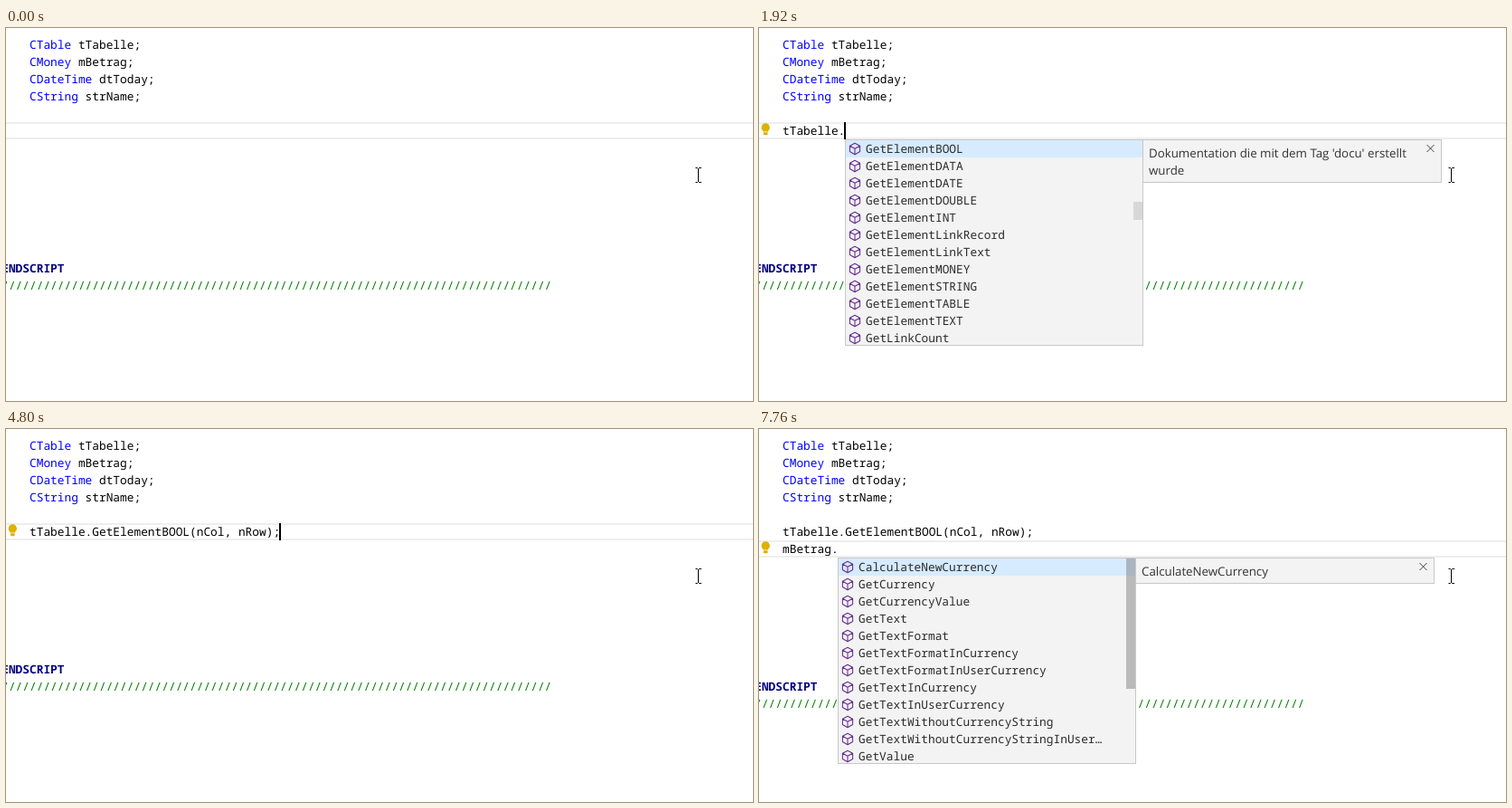
An HTML page for the animation above (8 s loop, 826 px wide and 412 px high).

```html
<!DOCTYPE html>
<html lang="de">
<head>
<meta charset="utf-8">
<title>Code completion</title>
<style>
  html, body { margin: 0; width: 100%; height: 100%; overflow: hidden; background: #fff; }
  svg { display: block; }
  text {
    font: 12.83px 'Noto Sans Mono', 'DejaVu Sans Mono', monospace;
    text-rendering: geometricPrecision;
    white-space: pre;
  }
  .type { fill: #00f; }
  .end { fill: #000080; font-weight: bold; }
  .comment { fill: #008000; }
  .item { fill: #2b2b2b; }
  .hit { fill: #0066bf; font-weight: bold; }
  .doc { font: 13.3px 'Open Sans', 'Noto Sans', sans-serif; fill: #333; }
</style>
</head>
<body>
<svg id="stage" width="826" height="412" viewBox="0 0 826 412">
  <defs>
    <g id="field" fill="none" stroke="#d67e00" stroke-width="1.15">
      <path d="M2.2 6.4 6.4 2.2 9 4.8 4.8 9ZM7.3 6.3H11.3M8.7 6.3V12.2H11.3"/>
      <path d="M11 6.6 13.3 4.3 15 6 12.7 8.3ZM11 12.3 13.3 10 15 11.7 12.7 14Z"/>
    </g>
    <g id="method" fill="none" stroke="#652d90" stroke-width="1.05" stroke-linejoin="round">
      <path d="M8 1.8 13.6 4.7V11L8 14.2 2.4 11V4.7ZM2.4 4.7 8 7.7 13.6 4.7M8 7.7V14.2"/>
    </g>
    <g id="bulb" fill="#ddb100">
      <path d="M7.3 1.3A4.7 4.7 0 0 1 10.2 9.6V10.5H4.4V9.6A4.7 4.7 0 0 1 7.3 1.3Z"/>
      <path d="M5 11.3H9.6V13.2L8.6 14.3H6L5 13.2Z"/>
    </g>
  </defs>
  <g id="code"></g>
  <path d="M762.5 154.5H764.5L765.5 155.5 766.5 154.5H769M765.5 155V170M762.5 170.5H764.5L765.5 169.5 766.5 170.5H769"
        fill="none" stroke="#000"/>
</svg>
<script>
const LOOP = 8000, CHAR = 7.698, LEFT = 26, ROW = 19, TOP = 104;
const CALL = 'tTabelle.GetElementBOOL(nCol, nRow);';
const DECLARED = ['CTable tTabelle;', 'CMoney mBetrag;', 'CDateTime dtToday;', 'CString strName;'];

const prefixed = (prefix, names) => names.split(' ').map(n => prefix + n);

const popups = {
  types: {
    icon: 'field', width: 430, bar: [1, 160],
    items: ['tTabelle', ...prefixed('TYPE_',
      'CTABLE BYTE CSTRING DATETIME INT PICTURE SUBTABLE FIXSTRING LINKTABLE SHORT VARSTRING')]
  },
  members: {
    icon: 'field', width: 430, bar: [1, 160], pick: 2,
    items: [...prefixed('m_', 'Job JobNr Rec Rec2 RecNr Step TabNr'), 'mBetrag',
      'DLG_EDIT_MONEY', 'DLG_EDIT_MULTILINE', 'SQLPARAM_COL_MONEY', 'TYPE_MONEY']
  },
  table: {
    icon: 'method', width: 330, bar: [69, 20],
    items: [...prefixed('GetElement',
      'BOOL DATA DATE DOUBLE INT LinkRecord LinkText MONEY STRING TABLE TEXT'), 'GetLinkCount'],
    doc: ["Dokumentation die mit dem Tag 'docu' erstellt", 'wurde']
  },
  money: {
    icon: 'method', width: 330, bar: [1, 144],
    items: ['CalculateNewCurrency', ...prefixed('Get', 'Currency CurrencyValue Text TextFormat ' +
      'TextFormatInCurrency TextFormatInUserCurrency TextInCurrency TextInUserCurrency ' +
      'TextWithoutCurrencyString TextWithoutCurrencyStringInUser… Value')],
    doc: ['CalculateNewCurrency']
  }
};

// Each step changes only the listed parts of the editor state.
const steps = [
  [0, { line1: '', line2: null, caret: 0, bulb: null, popup: null, thumb: 0, doc: 0, sel: 0 }],
  [150, { caret: 1 }],
  [530, { line1: 't' }],
  [610, { popup: 'types' }],
  [690, { thumb: 1 }],
  [760, { line1: 'tT' }],
  [910, { line1: 'tTA', thumb: 0 }],
  [1150, { bulb: 0 }],
  [1390, { caret: 0 }],
  [1620, { line1: 'tTabelle', popup: null, caret: 1 }],
  [1770, { line1: 'tTabelle.' }],
  [1920, { popup: 'table', doc: 1, thumb: .5 }],
  [2000, { thumb: 1 }],
  [2380, { caret: 0 }],
  [2620, { thumb: .6 }],
  [2850, { thumb: .3, caret: 1 }],
  [3150, { thumb: 0 }],
  [3320, { caret: 0 }],
  [3700, { line1: CALL, popup: null, doc: 0, sel: 24, caret: 1 }],
  [4170, { caret: 0 }],
  [4480, { sel: 30, caret: 1 }],
  [4800, { sel: 0 }],
  [5340, { line2: '' }],
  [5560, { bulb: null }],
  [5820, { caret: 0 }],
  [6120, { line2: 'm', popup: 'members', caret: 1 }],
  [6350, { line2: 'mB' }],
  [6520, { line2: 'mBe', bulb: 1 }],
  [6980, { line2: 'mBetrag', popup: null }],
  [7220, { line2: 'mBetrag.' }],
  [7300, { popup: 'money' }],
  [7370, { doc: 1, thumb: .5 }],
  [7450, { thumb: 1 }],
  [7760, { caret: 0 }]
];

const colX = n => LEFT + n * CHAR;
const rect = (x, y, w, h, fill, extra = '') =>
  `<rect x="${x}" y="${y}" width="${w}" height="${h}" fill="${fill}" ${extra}/>`;
const text = (x, y, str, cls = '') => `<text x="${x}" y="${y}" class="${cls}">${str}</text>`;
const span = (str, cls) => `<tspan class="${cls}">${str}</tspan>`;
const use = (id, x, y) => `<use href="#${id}" x="${x}" y="${y}"/>`;
const panel = (x, y, w, h) =>
  rect(x + .5, y + .5, w - 1, h - 1, '#f3f3f3', 'stroke="#c8c8c8"');

// Positions of the typed letters in a name, word starts first; null if one is missing.
function match(name, typed) {
  const low = name.toLowerCase(), hits = [];
  let from = 0;
  for (const ch of typed.toLowerCase()) {
    const word = low.indexOf('_' + ch, from);
    const at = word < 0 ? low.indexOf(ch, from) : word + 1;
    if (at < 0) return null;
    hits.push(at);
    from = at + 1;
  }
  return hits;
}

function drawPopup(s, line, row) {
  const p = popups[s.popup];
  const typed = p.icon === 'field' ? line : '';
  const x = Math.floor(colX(line.length)), y = TOP + ROW * (row + 1);
  const starts = n => n.toLowerCase().startsWith(typed.toLowerCase()) ? 0 : 1;
  const names = p.items.filter(n => match(n, typed));
  if (typed.length > 1) names.sort((a, b) => starts(a) - starts(b));
  const pick = typed.length === 1 && p.pick || 0;
  const h = Math.min(12 * ROW, names.length * ROW + 2);

  let rows = rect(0, pick * ROW, p.width - 2, ROW, '#d6ebff');
  names.forEach((name, i) => {
    const hits = match(name, typed);
    const label = [...name].map((c, k) => hits.includes(k) ? span(c, 'hit') : c).join('');
    rows += use(p.icon, p.icon === 'field' ? 2.5 : 2, i * ROW + 1.5) + text(22, i * ROW + 14, label, 'item');
  });
  const [barY, barH] = p.bar;
  rows += rect(p.width - 12, barY - 1, 10, barH, '#646464', `opacity="${.4 * s.thumb}"`);

  let out = panel(x, y, p.width, h) +
    `<svg x="${x + 1}" y="${y + 1}" width="${p.width - 2}" height="${h - 2}">${rows}</svg>`;
  if (s.doc) {
    const dx = x + p.width;
    out += panel(dx - 1, y, 331, p.doc.length * ROW + 10) +
      p.doc.map((d, i) => text(dx + 6, y + 20 + i * ROW, d, 'doc')).join('') +
      `<path d="M${dx + 313.5} ${y + 6}l8 8m0-8l-8 8" stroke="#424242"/>`;
  }
  return out;
}

function draw(s) {
  const row = s.line2 === null ? 0 : 1;
  const line = row ? s.line2 : s.line1;
  const y = TOP + row * ROW;
  let out = '';

  if (s.sel) {
    for (const at of [24, 30]) {
      const x = Math.round(colX(at));
      out += rect(x, TOP, 31, ROW, at === s.sel ? '#8cb5e0' : '#ced6e0');
    }
    out += rect(Math.floor(colX(CALL.length)) - .5, TOP, 1.5, ROW, '#8498b1');
  } else {
    out += rect(0, y, 826, 2, '#eee') + rect(0, y + ROW - 2, 826, 2, '#eee');
  }

  DECLARED.forEach((d, i) => {
    const [type, name] = d.split(' ');
    out += text(LEFT, 23 + i * ROW, span(type, 'type') + ' ' + name);
  });
  out += text(LEFT, TOP + 14, s.line1) + text(LEFT, TOP + ROW + 14, s.line2 || '');
  out += text(colX(-4), 270 + row * ROW, 'ENDSCRIPT', 'end');
  out += text(colX(-4), 289 + row * ROW, '/'.repeat(79), 'comment');

  if (s.bulb !== null) out += use('bulb', 0, TOP + s.bulb * ROW);
  if (s.popup) out += drawPopup(s, line, row);
  if (s.caret) {
    const col = s.sel ? s.sel + 4 : line.length;
    out += rect(Math.floor(colX(col) - 1), y, 2, ROW, '#000');
  }
  return out;
}

const code = document.getElementById('code');
const start = performance.now();
let shown = -1;

function tick() {
  const t = Math.max(0, performance.now() - start) % LOOP;
  const past = steps.filter(([at]) => at <= t);
  if (past.length !== shown) {
    shown = past.length;
    code.innerHTML = draw(Object.assign({}, ...past.map(([, change]) => change)));
  }
  requestAnimationFrame(tick);
}
tick();
</script>
</body>
</html>
```
